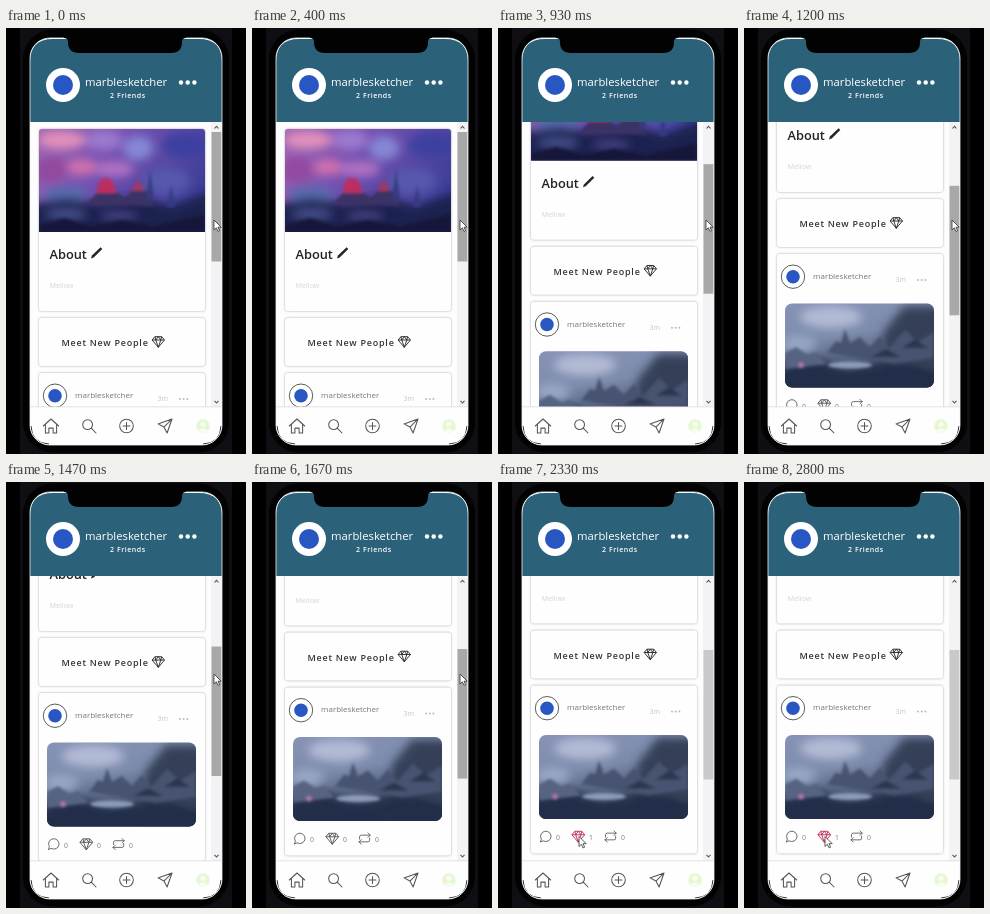
These frames come from a looping animation (240x426 px, 2.87 s). An HTML page:

```html
<!DOCTYPE html>
<html lang="en">
<head>
<meta charset="utf-8">
<title>Profile screen</title>
<style>
  html, body { margin: 0; width: 100%; height: 100%; overflow: hidden; background: #000; }
  svg { display: block; width: 100vw; height: 100vh; }
  text { font-family: "Open Sans", "Noto Sans", sans-serif; }
  .icon { fill: none; stroke: #555; stroke-width: 1.5; stroke-linejoin: round; stroke-linecap: round; }
  .card { fill: #fefefe; filter: drop-shadow(0 .7px .8px rgba(0, 0, 0, .34)); }
  .count { font-size: 6.8px; fill: #777; }
</style>
</head>
<body>
<svg viewBox="0 0 240 426" preserveAspectRatio="none">
  <defs>
    <clipPath id="screen"><rect x="24" y="10" width="192" height="407" rx="20"/></clipPath>
    <clipPath id="view"><rect x="24" y="94" width="181" height="285"/></clipPath>
    <clipPath id="bannerClip"><path d="M33 204V104a3 3 0 0 1 3-3H196a3 3 0 0 1 3 3V204z"/></clipPath>
    <clipPath id="postClip"><rect x="41" y="394.5" width="149" height="84" rx="7"/></clipPath>
    <filter id="soft" x="-40%" y="-40%" width="180%" height="180%"><feGaussianBlur stdDeviation="5"/></filter>
    <filter id="haze" x="-40%" y="-40%" width="180%" height="180%"><feGaussianBlur stdDeviation="1.4"/></filter>
    <linearGradient id="dusk" x1="0" y1="0" x2="1" y2=".5">
      <stop offset="0" stop-color="#a566b4"/><stop offset=".5" stop-color="#704fb0"/><stop offset="1" stop-color="#3d3f98"/>
    </linearGradient>
    <linearGradient id="mist" x1="0" y1="0" x2=".3" y2="1">
      <stop offset="0" stop-color="#8793b6"/><stop offset=".45" stop-color="#7c8bab"/><stop offset="1" stop-color="#2d3852"/>
    </linearGradient>

    <path id="home" class="icon" d="M-11 0 0-10 11 0M-8-2.5V10H-3V3H3V10H8V-2.5"/>
    <path id="search" class="icon" d="M5-2A7 7 0 1 1-9-2A7 7 0 1 1 5-2M3.5 3.5 10 10"/>
    <path id="plus" class="icon" d="M10 0A10 10 0 1 1-10 0A10 10 0 1 1 10 0M-5 0H5M0-5V5"/>
    <path id="send" class="icon" d="M10-10-10-3-1.5 1.5 3 10zL-1.5 1.5"/>
    <path id="bubble" class="icon" d="M-9 9-7.5 4.5A9 9 0 1 1-4 7.8z"/>
    <path id="repeat" class="icon" d="M6-10 10-6 6-2M-9 1V-3a3 3 0 0 1 3-3H10M-6 10-10 6-6 2M9-1V3a3 3 0 0 1-3 3H-10"/>
    <path id="gem" d="M-6-9H6L11-3 0 10-11-3zM-11-3H11M-6-9-4.5-3 0 10 4.5-3 6-9M-4.5-3 0-9 4.5-3"
      fill="none" stroke-width="1.6" stroke-linejoin="round"/>
  </defs>

  <rect width="240" height="426"/>
  <rect x="14" width="212" height="426" fill="#0e0e13"/>
  <rect x="17" y="1.5" width="206" height="423" rx="30" fill="#020203"/>

  <g clip-path="url(#screen)">
    <rect x="24" y="10" width="192" height="407" fill="#fdfdfe"/>

    <g clip-path="url(#view)">
      <g id="page">
        <rect class="card" x="33" y="101" width="166" height="182" rx="3"/>
        <g clip-path="url(#bannerClip)">
          <rect x="33" y="101" width="166" height="103" fill="url(#dusk)"/>
          <g filter="url(#soft)">
            <ellipse cx="56" cy="112" rx="24" ry="9" fill="#e291bb"/>
            <ellipse cx="98" cy="112" rx="18" ry="10" fill="#9a79cf"/>
            <ellipse cx="132" cy="120" rx="15" ry="12" fill="#8587d4"/>
            <ellipse cx="180" cy="117" rx="24" ry="13" fill="#3d3fa0"/>
            <ellipse cx="45" cy="142" rx="16" ry="13" fill="#92489f"/>
            <ellipse cx="76" cy="139" rx="15" ry="8" fill="#d26fad"/>
            <ellipse cx="108" cy="141" rx="20" ry="8" fill="#b071c3"/>
            <ellipse cx="160" cy="153" rx="24" ry="13" fill="#5658ac"/>
            <ellipse cx="59" cy="166" rx="22" ry="8" fill="#566bad"/>
            <path d="M25 176 60 170 94 175 130 168 165 178 207 162V212H25z" fill="#1e2150"/>
            <ellipse cx="60" cy="186" rx="20" ry="5" fill="#454f8c"/>
            <ellipse cx="113" cy="188" rx="18" ry="4" fill="#454285"/>
          </g>
          <g filter="url(#haze)">
            <path d="M91 166Q91 150 100 150T110 166z" fill="#bb2f60"/>
            <path d="M124 164 132 151 139 164z" fill="#9c3868"/>
            <path d="M80 177 91 165H112L120 171 125 163H140L149 178z" fill="#3a3065"/>
            <path d="M140 172 144 141 148 172zM161 179 165 157 169 179z" fill="#343b80"/>
            <path d="M33 197 58 190 85 198 116 192 148 198 199 186V204H33z" fill="#14173a"/>
          </g>
        </g>
        <text x="43.5" y="231" font-size="12.8" font-weight="600" fill="#222">About</text>
        <path d="M85 230.5 85.9 227.6 94.6 219.2 96.3 220.9 87.7 229.5z" fill="#2a2522"/>
        <text x="43.5" y="260" font-size="7.2" fill="#d5d5cf">Mellow</text>

        <rect class="card" x="33" y="290" width="166" height="48" rx="3"/>
        <text x="55.5" y="318" font-size="9" font-weight="600" letter-spacing=".75" fill="#333">Meet New People</text>
        <use href="#gem" transform="translate(152.3 313.7) scale(.56)" stroke="#222"/>

        <rect class="card" x="33" y="345" width="166" height="168" rx="3"/>
        <circle cx="49" cy="367.7" r="11.7" fill="#fff" stroke="#333" stroke-width=".8"/>
        <circle cx="49" cy="367.7" r="6.8" fill="#2857c4"/>
        <text x="69" y="369.7" font-size="8" fill="#777">marblesketcher</text>
        <text x="151.5" y="373" font-size="7" fill="#c4c4c4">3m</text>
        <g fill="#bbb"><circle cx="174" cy="371" r="1"/><circle cx="177.7" cy="371" r="1"/><circle cx="181.4" cy="371" r="1"/></g>
        <g clip-path="url(#postClip)">
          <rect x="41" y="394" width="149" height="85" fill="url(#mist)"/>
          <g filter="url(#soft)">
            <ellipse cx="87" cy="408" rx="31" ry="11" fill="#b2bad5"/>
            <ellipse cx="55" cy="435" rx="17" ry="9" fill="#98a6c5"/>
            <path d="M140 422 160 397H200V488H132z" fill="#344058"/>
            <path d="M35 458 70 448 105 462 150 451 196 465V486H35z" fill="#222e48"/>
          </g>
          <g filter="url(#haze)">
            <path d="M83 444 92 432 97 434 101 420 106 434 116 428 126 438 136 427 145 439 161 421 174 433 190 423V449L150 455 116 449z" fill="#46526f"/>
            <path d="M41 444 52 438 64 446 72 443 83 455 41 460z" fill="#566481"/>
            <ellipse cx="106" cy="456" rx="22" ry="3.5" fill="#8c9bb8"/>
            <path d="M41 467 66 460 85 469 113 464 139 472 165 457 190 464V479H41z" fill="#242f48"/>
            <path d="M127 448 142 440 157 448zM158 439 171 430 184 439z" fill="#2b364f"/>
          </g>
          <circle cx="57" cy="456" r="2.8" fill="#b876ab" filter="url(#haze)"/>
        </g>
        <use href="#bubble" transform="translate(47.7 496) scale(.58)"/>
        <text class="count" x="58" y="499.5">0</text>
        <use id="like" href="#gem" transform="translate(80.3 496) scale(.58)" stroke="#555"/>
        <text id="likes" class="count" x="91" y="499.5">0</text>
        <use href="#repeat" transform="translate(112.6 496) scale(.56)"/>
        <text class="count" x="123" y="499.5">0</text>
      </g>
    </g>

    <rect x="205" y="94" width="11" height="285" fill="#f3f3f5"/>
    <rect id="thumb" x="205.5" y="104" width="10" height="129.5" fill="#a8a8a8"/>
    <path d="M208.5 100.5 210.5 98.3 212.5 100.5M208.5 372.8 210.5 375 212.5 372.8" fill="none" stroke="#555" stroke-width="1.1"/>

    <path d="M24 94V34Q24 11 47 11H193Q216 11 216 34V94z" fill="#2c617a"/>
    <circle cx="57" cy="57" r="17" fill="#fff"/>
    <circle cx="57" cy="57" r="10" fill="#2857c4"/>
    <text x="79" y="57.5" font-size="11.3" fill="#fff">marblesketcher</text>
    <text x="104" y="69.7" font-size="7" font-weight="600" letter-spacing=".55" fill="#fff">2 Friends</text>
    <g fill="#fff"><circle cx="175" cy="54.5" r="2.2"/><circle cx="181.7" cy="54.5" r="2.2"/><circle cx="188.4" cy="54.5" r="2.2"/></g>

    <rect x="24" y="379" width="192" height="38" fill="#fefefe"/>
    <path d="M24 378.8H216" stroke="#dcdce0" stroke-width=".8"/>
    <use href="#home" transform="translate(45 398) scale(.7)"/>
    <use href="#search" transform="translate(83 398) scale(.7)"/>
    <use href="#plus" transform="translate(120.5 398) scale(.68)"/>
    <use href="#send" transform="translate(159 398) scale(.7)"/>
    <circle cx="197" cy="398" r="6.8" fill="#e6f8d2"/>
    <circle cx="197" cy="396.2" r="2.5" fill="#f8fdf2"/>
    <path d="M192.4 402.8Q197 397.5 201.6 402.8Q197 406 192.4 402.8z" fill="#f8fdf2"/>
    <path d="M25 398Q25.5 415.5 43 416M215 398Q214.5 415.5 197 416" fill="none" stroke="#111" stroke-width=".9"/>
  </g>

  <rect x="24" y="10" width="192" height="407" rx="20" fill="none" stroke="#eef2f4" stroke-width=".8"/>
  <path d="M58 8.5V10Q62 10 62 14Q62 25 73 25H165Q176 25 176 14Q176 10 180 10V8.5z" fill="#020203"/>

  <path id="cursor" d="M0 0V10L2.3 7.8 4 11.4 5.6 10.7 4 7.2H7.2z" fill="#fff" stroke="#333" stroke-width=".8" stroke-linejoin="round"/>
</svg>
<script>
  const LOOP = 2870, CLICK = 2200;
  const $ = id => document.getElementById(id);

  // time, scroll position, speed
  const scrollKeys = [
    [600, 0, 0], [730, 22, .24], [1200, 119, .09], [1670, 139.5, .03], [1740, 141.5, 0]
  ];

  function scrollAt(t) {
    if (t <= scrollKeys[0][0]) return 0;
    const i = scrollKeys.findIndex(k => k[0] >= t);
    if (i < 0) return scrollKeys.at(-1)[1];
    const [t0, y0, v0] = scrollKeys[i - 1], [t1, y1, v1] = scrollKeys[i];
    const d = t1 - t0, u = (t - t0) / d, w = 1 - u;
    return w * w * ((1 + 2 * u) * y0 + u * d * v0) + u * u * ((3 - 2 * u) * y1 - w * d * v1);
  }

  function ease(t, from, to) {
    const u = Math.min(1, Math.max(0, (t - from) / (to - from)));
    return u * u * (3 - 2 * u);
  }

  // 15 pictures a second, on whole hundredths
  function step(t) {
    let k = Math.ceil(t * .015) + 1;
    const at = n => Math.round(n * 20 / 3) * 10;
    while (at(k) > t) k--;
    return at(k);
  }

  function draw(t) {
    const y = scrollAt(t), move = ease(t, 1730, 2140), liked = t >= CLICK;
    const cx = 208 - 127 * move, cy = 192 + 162.5 * move;
    $('page').setAttribute('transform', `translate(0 ${-y})`);
    $('thumb').setAttribute('y', 104 + y * .452);
    $('thumb').setAttribute('fill', cx > 205 ? '#a8a8a8' : '#c9c9cb');
    $('cursor').setAttribute('transform', `translate(${cx} ${cy})`);
    $('like').setAttribute('stroke', liked ? '#c22a55' : '#555');
    $('likes').textContent = liked ? '1' : '0';
  }

  const start = performance.now();
  function tick() {
    draw(step((performance.now() - start) % LOOP));
    requestAnimationFrame(tick);
  }
  tick();
</script>
</body>
</html>
```
